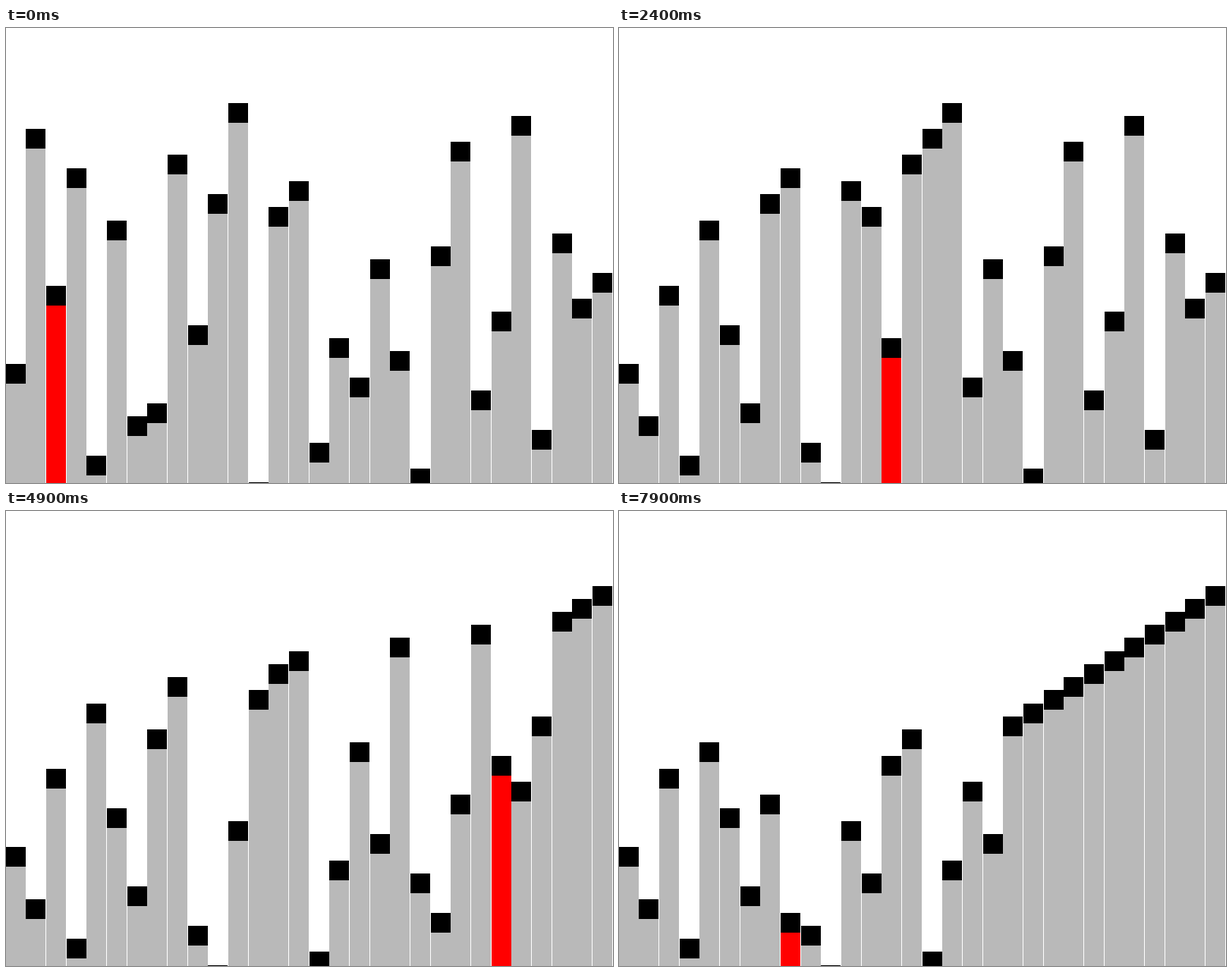
Write a matplotlib script that moves like this. It is 800 px wide and 600 px high and loops after 8000 ms.

```python
"""Smoothsort on thirty values, shown as bars with the sifted one in red."""
from itertools import islice

import matplotlib.pyplot as plt
from matplotlib.animation import FuncAnimation

W, H = 800, 600
STEPS, INTERVAL = 80, 100
BOX = 26
GRAY, RED = "#b9b9b9", "#ff0000"
LEO = [1, 1, 3, 5, 9, 15, 25]  # Leonardo numbers: heap sizes by order
VALUES = [9, 27, 15, 24, 2, 20, 5, 6, 25, 12, 22, 29, 0, 21, 23,
          3, 11, 8, 17, 10, 1, 18, 26, 7, 13, 28, 4, 19, 14, 16]
N = len(VALUES)


def children(pos, order):
    """Left and right subheaps as (root, order)."""
    return [(pos - 1 - LEO[order - 2], order - 1), (pos - 1, order - 2)]


def swap(a, i, j):
    a[i], a[j] = a[j], a[i]


def sift(a, pos, order):
    """Move a root down inside its heap, reporting each visit."""
    while order > 1:
        yield a.copy(), pos
        child, child_order = max(children(pos, order), key=lambda c: a[c[0]])
        if a[child] <= a[pos]:
            return
        swap(a, pos, child)
        pos, order = child, child_order


def trinkle(a, heaps):
    """Move the last root left along the heap roots, then sift it."""
    k = len(heaps) - 1
    while k > 0:
        pos, order = heaps[k]
        prev = heaps[k - 1][0]
        rivals = [pos]
        if order > 1:
            rivals += [c for c, _ in children(pos, order)]
        if any(a[r] >= a[prev] for r in rivals):
            break
        swap(a, pos, prev)
        k -= 1
    yield from sift(a, *heaps[k])


def smoothsort(values):
    a, heaps = list(values), []
    for i in range(len(a)):
        if len(heaps) > 1 and heaps[-2][1] == heaps[-1][1] + 1:
            heaps.pop()
            heaps.append((i, heaps.pop()[1] + 1))
        else:
            heaps.append((i, 0 if heaps and heaps[-1][1] == 1 else 1))
        yield from trinkle(a, heaps)
    while heaps:
        pos, order = heaps.pop()
        yield a.copy(), pos
        if order > 1:
            for child in children(pos, order):
                heaps.append(child)
                yield from trinkle(a, heaps)


states = list(islice(smoothsort(VALUES), STEPS))

fig = plt.figure(figsize=(W / 100, H / 100), dpi=100, facecolor="white")
ax = fig.add_axes([0, 0, 1, 1])
ax.axis("off")

xs = [i * W // N for i in range(N)]
style = dict(width=BOX, align="edge", linewidth=0, antialiased=False)
bars = ax.bar(xs, [H] * N, color=GRAY, **style)
caps = ax.bar(xs, [BOX] * N, color="black", **style)
ax.set_xlim(0, W)
ax.set_ylim(H, 0)


def draw(frame):
    a, current = states[frame]
    for i, (bar, cap) in enumerate(zip(bars, caps)):
        top = H - 1 - -(-a[i] * 500 // (N - 1))
        cap.set_y(top)
        bar.set_y(top)
        bar.set_height(H - top)
        bar.set_facecolor(RED if i == current else GRAY)
    return [*bars, *caps]


anim = FuncAnimation(fig, draw, frames=STEPS, init_func=lambda: draw(0),
                     interval=INTERVAL, repeat=True, repeat_delay=0)
plt.show()
```
